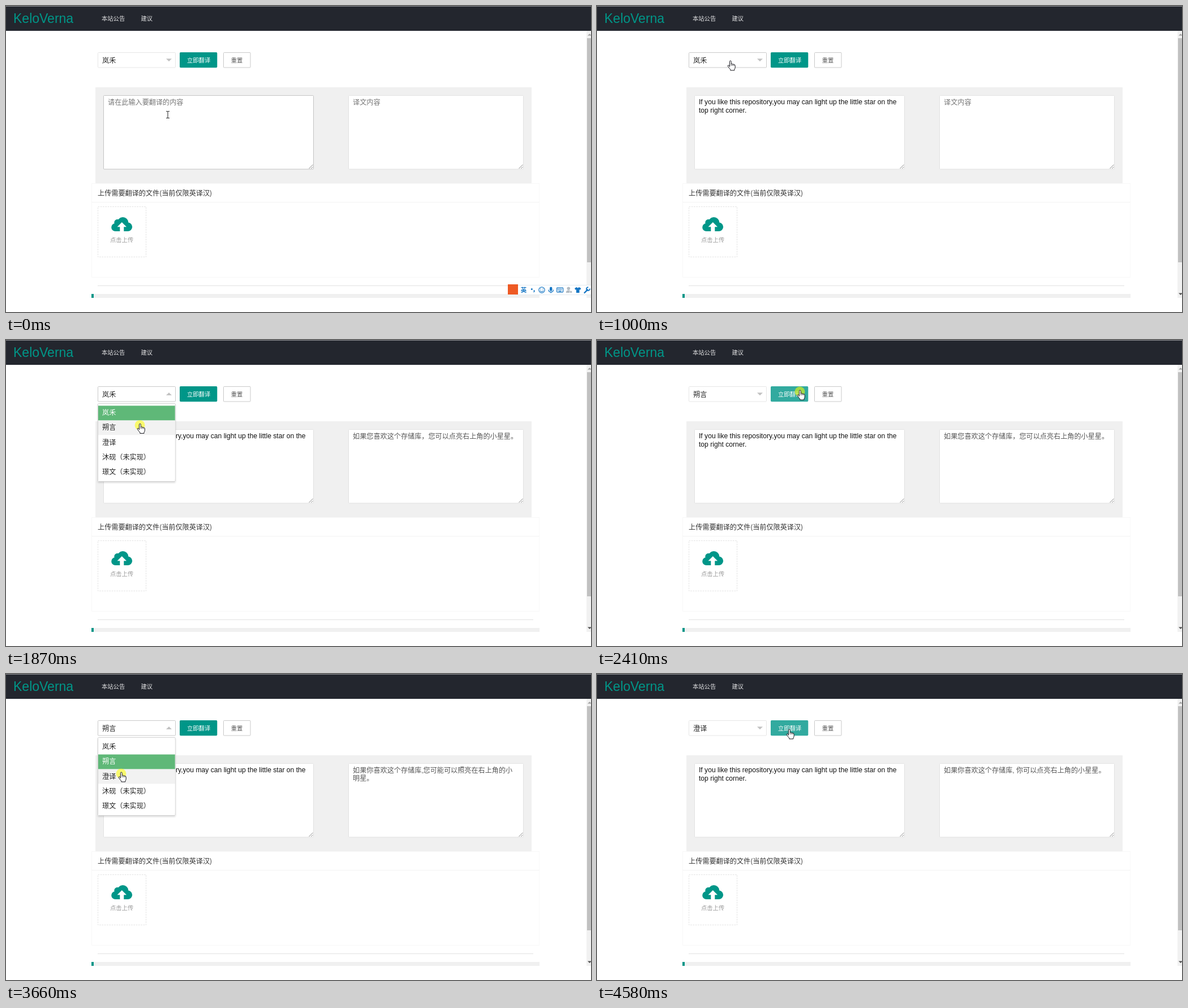
Recreate the animation shown at these times as an HTML page. Size 1034x542 px, loop 4.98 s.

```html
<!DOCTYPE html>
<html lang="zh-CN">
<head>
<meta charset="utf-8">
<title>KeloVerna</title>
<style>
html, body { margin: 0; width: 100%; height: 100%; overflow: hidden; background: #fff; }
svg { display: block; width: 1034px; height: 542px; }
text { font: 12.14px "Liberation Sans", Arial, "Noto Sans CJK SC", "Noto Sans CJK", sans-serif; white-space: pre; }
.ui { font-family: "Noto Sans CJK SC", "Noto Sans CJK", sans-serif; }
.small { font-size: 10.3px; }
</style>
</head>
<body>
<svg viewBox="0 0 1034 542" xmlns="http://www.w3.org/2000/svg">
  <defs>
    <filter id="soft" x="-10%" y="-10%" width="120%" height="125%">
      <feDropShadow dx="0" dy="2" stdDeviation="1.8" flood-color="#000" flood-opacity=".14"/>
    </filter>
    <path id="grip" d="M-7 0L0 -7M-3.2 0L0 -3.2" stroke="#777" stroke-width=".9"/>
  </defs>
  <rect width="1034" height="542" fill="#fff"/>

  <!-- header -->
  <rect width="1034" height="44" fill="#23262e"/>
  <rect width="1034" height="1" fill="#8f9194"/>
  <text x="13" y="30" fill="#009688" style="font-size:23px">KeloVerna</text>
  <g fill="#e4e4e5">
    <text class="ui small" x="169" y="26.4">本站公告</text>
    <text class="ui small" x="238.5" y="26.4">建议</text>
  </g>

  <!-- scrollbar -->
  <rect x="1026" y="44" width="8" height="473" fill="#f1f1f1"/>
  <rect x="1027" y="57" width="7" height="397" fill="#c1c1c1"/>
  <path d="M1028 52.5h7l-3.5 -3.5z" fill="#a3a3a3"/>
  <path d="M1028 508.5h7l-3.5 3.5z" fill="#505050"/>

  <!-- form row -->
  <rect id="box" x="162.5" y="82.5" width="137" height="26.5" rx="1" fill="#fff"/>
  <text id="chosen" class="ui" x="170" y="100.8" fill="#222"></text>
  <path id="edge" d="M-5 -5H5L0 0z" fill="#c2c2c2"/>
  <g id="go">
    <rect x="307" y="82" width="66.3" height="27.3" rx="1.7" fill="#009688"/>
    <text class="ui small" x="320" y="99.6" fill="#fff" font-weight="500">立即翻译</text>
  </g>
  <rect x="384.5" y="82.5" width="47.5" height="26.5" rx="1" fill="#fff" stroke="#c9c9c9"/>
  <text class="ui small" x="397.8" y="99.6" fill="#555">重置</text>

  <!-- text panel -->
  <rect x="158" y="144" width="771" height="170" fill="#f0f0f0"/>
  <rect id="area" x="172.5" y="158.5" width="371" height="130.5" rx="1" fill="#fff"/>
  <rect x="605.5" y="158.5" width="309" height="130.5" rx="1" fill="#fff" stroke="#e2e2e2"/>
  <use href="#grip" x="542.5" y="288"/>
  <use href="#grip" x="913.5" y="288"/>
  <text id="hint" class="ui" x="180" y="175.3" fill="#757575">请在此输入要翻译的内容</text>
  <g id="typed" fill="#111">
    <text x="180" y="174.3">If you like this repository,you may can light up the little star on the</text>
    <text x="180" y="188.8">top right corner.</text>
  </g>
  <path id="caret" d="M265.5 178.5V191.5" stroke="#111"/>
  <text id="out1" x="613" y="174.8"></text>
  <text id="out2" x="613" y="189.4"></text>

  <!-- upload card -->
  <rect x="151.5" y="314.5" width="791" height="166" fill="none" stroke="#f8f8f8"/>
  <path d="M151 347.5H943" stroke="#f3f3f3"/>
  <text class="ui" x="162" y="336" fill="#333">上传需要翻译的文件(当前仅限英译汉)</text>
  <rect x="162.5" y="355.5" width="85" height="89" fill="#fff" stroke="#e2e2e2" stroke-dasharray="2.6 1.7"/>
  <g fill="#009688">
    <circle cx="206.5" cy="384" r="10"/>
    <circle cx="197" cy="383.5" r="5.7"/>
    <circle cx="193.2" cy="392" r="7"/>
    <circle cx="215.3" cy="391.2" r="7.8"/>
    <path d="M193 386H215V399H193z"/>
  </g>
  <path d="M204.8 383L213 391.3H208.3V399.5H201.3V391.3H196.6z" fill="#fff"/>
  <text class="ui small" x="184" y="417.8" fill="#999">点击上传</text>

  <path d="M162 495.5H932" stroke="#e2e2e2"/>
  <rect x="151" y="510" width="792" height="7" fill="#f0f0f0"/>
  <rect x="151" y="510" width="4" height="7" fill="#009688"/>

  <!-- input method bar -->
  <g id="ime">
    <rect x="900" y="494.5" width="140" height="17" fill="#fff" stroke="#e3e9ee"/>
    <rect x="887" y="493" width="18" height="18" fill="#ee5a24"/>
    <text class="ui" x="909.7" y="506.9" fill="#1576c4" style="font-size:10.5px;font-weight:bold">英</text>
    <g fill="#1576c4">
      <circle cx="929.3" cy="501.5" r="1.5"/>
      <path d="M932.5 503.5h2.2v2l-1.6 2h-.8l.7 -2h-.5z"/>
      <rect x="961" y="497.5" width="4.4" height="7.5" rx="2.2"/>
      <path d="M1008.5 498l2.2 1.4 2.2 -1.4 3.4 2 -1.2 2.8 -1.6 -.6v5.8h-5.6v-5.8l-1.6 .6 -1.2 -2.8z"/>
    </g>
    <g fill="none" stroke="#1576c4" stroke-width="1.2">
      <circle cx="947" cy="503" r="5.2"/>
      <path d="M944 504.2q3 3.6 6 0M945 500.5v1.6M949 500.5v1.6"/>
      <path d="M959 502.5q0 4.2 4.2 4.2t4.2 -4.2M963.2 506.7v2"/>
      <rect x="973.6" y="499.2" width="11" height="7.6" rx=".8"/>
      <path d="M975.2 501.4h8M975.2 503.2h8" stroke-dasharray="1.2 .8"/>
      <path d="M976.6 505.2h5"/>
    </g>
    <g fill="#b4bcc3">
      <circle cx="994.3" cy="500.3" r="2.8"/>
      <path d="M989.8 508q0 -4.4 4.5 -4.4t4.5 4.4z"/>
      <circle cx="998.6" cy="506.4" r="2.2" stroke="#fff" stroke-width=".8"/>
    </g>
    <path d="M1022.5 508L1028 502.4" stroke="#1576c4" stroke-width="2.4" stroke-linecap="round"/>
    <path d="M1031.8 500.6a3 3 0 1 1 -2.6 -2.4" fill="none" stroke="#1576c4" stroke-width="1.8"/>
  </g>

  <!-- drop-down list -->
  <g id="list">
    <rect x="162.5" y="112.5" width="136.7" height="138" rx="1" fill="#fff" stroke="#d2d2d2" filter="url(#soft)"/>
    <g id="rows"></g>
  </g>

  <!-- pointer -->
  <circle id="spot" r="9" fill="#ffff00" opacity=".55"/>
  <g id="pointer">
    <g id="hand" fill="#fff" stroke="#16161c" stroke-width="1" stroke-linejoin="round">
      <path d="M-1.6 10.5V1.4Q-1.6 0 -.2 0T1.2 1.4V6Q1.6 5.2 2.5 5.3 3.6 5.5 3.7 6.4 4.2 5.9 5 6 6.1 6.2 6.1 7.2 6.6 6.8 7.3 7 8.2 7.3 8.2 8.4V12Q8 14 6.9 15.2V17H-.2V15.5Q-2.5 13 -4.6 9.8 -5.3 8.4 -4.2 7.9 -3.2 7.6 -1.6 9.6z"/>
      <path d="M1.2 6V9M3.7 6.4V9M6.1 7.2V9" fill="none" stroke-width=".8"/>
    </g>
    <path id="arrow" d="M0 0V13.6L3.2 10.7 5.2 15.2 7.2 14.3 5.2 9.9H9.6z" fill="#fff" stroke="#111" stroke-width=".9"/>
    <path id="beam" d="M-3 -5.5H-1Q0 -5.5 0 -4.5 0 -5.5 1 -5.5H3M0 -5V6M-3 6.5H-1Q0 6.5 0 5.5 0 6.5 1 6.5H3" fill="none" stroke="#333" stroke-width="1.1"/>
  </g>
</svg>
<script>
const LOOP = 4980;
const $ = id => document.getElementById(id);
const engines = ["岚禾", "朔言", "澄译", "沐砚（未实现）", "璟文（未实现）"];
const results = [
  ["译文内容", ""],
  ["如果您喜欢这个存储库，您可以点亮右上角的小星星。", ""],
  ["如果你喜欢这个存储库,您可能可以照亮在右上角的小", "明星。"],
  ["如果你喜欢这个存储库, 你可以点亮右上角的小星星。", ""]
];
// screen updates: first, last, count
const runs = [[0, 0, 1], [230, 230, 1], [470, 920, 7], [1000, 1480, 7], [1560, 1640, 2], [1800, 2260, 7],
  [2330, 2650, 5], [2820, 3280, 7], [3350, 3350, 1], [3580, 4050, 7], [4120, 4200, 2], [4350, 4580, 4]];
// pointer path: time, x, y
const path = [[400, 286, 192], [620, 312, 135], [695, 330, 100], [770, 331, 97], [845, 312, 97], [920, 262, 96],
  [1000, 236, 97], [1240, 240, 97], [1480, 242, 96], [1560, 240, 112], [1640, 238, 145], [1800, 238, 147],
  [1950, 236, 150], [2100, 290, 118], [2180, 335, 98], [2260, 358, 92], [2330, 359, 89], [2490, 359, 89],
  [2570, 315, 93], [2650, 255, 97], [2820, 233, 98], [3050, 231, 98], [3200, 208, 170], [3280, 205, 181],
  [3350, 205, 183], [3580, 204, 174], [3730, 204, 174], [3890, 270, 128], [4050, 351, 110], [4120, 347, 104],
  [4200, 343, 102], [4350, 341, 100], [4580, 340, 98]];
const opens = [[1240, 1950], [2895, 3730]];
const clicks = [770, 1240, 1870, 2410, 2890, 3650, 4420];

const steps = runs.flatMap(([a, b, n]) =>
  Array.from({ length: n }, (_, i) => n > 1 ? Math.floor((a + (b - a) * i / (n - 1)) / 10) * 10 : a));

const rows = engines.map((name, i) => {
  const make = (tag, attrs) => {
    const el = document.createElementNS("http://www.w3.org/2000/svg", tag);
    for (const k in attrs) el.setAttribute(k, attrs[k]);
    return $("rows").appendChild(el);
  };
  const y = 116.4 + 26.1 * i;
  const band = make("rect", { x: 163, y, width: 135.7, height: 26.1 });
  const label = make("text", { class: "ui", x: 170, y: y + 16.9 });
  label.textContent = name;
  return { y, band, label };
});

const set = (id, k, v) => $(id).setAttribute(k, v);
const show = (id, on) => set(id, "visibility", on ? "visible" : "hidden");
const inside = ([x, y], l, t, r, b) => x >= l && x <= r && y >= t && y <= b;
const count = (t, ...times) => times.filter(v => t >= v).length;

// cubic-bezier(.25, .1, .25, 1)
function ease(x) {
  if (x <= 0) return 0;
  if (x >= 1) return 1;
  const curve = (s, a, b) => 3 * a * s * (1 - s) ** 2 + 3 * b * s * s * (1 - s) + s ** 3;
  let lo = 0, hi = 1;
  for (let i = 0; i < 24; i++) {
    const mid = (lo + hi) / 2;
    if (curve(mid, .25, .25) < x) lo = mid; else hi = mid;
  }
  return curve(lo, .1, 1);
}

function pointerAt(t) {
  const i = path.findIndex(p => p[0] > t);
  if (i === 0) return path[0].slice(1);
  if (i < 0) return path[path.length - 1].slice(1);
  const [a, b] = [path[i - 1], path[i]];
  const k = (t - a[0]) / (b[0] - a[0]);
  return [a[1] + (b[1] - a[1]) * k, a[2] + (b[2] - a[2]) * k];
}

function draw(time) {
  const t = steps.filter(s => s <= time).pop();
  const pos = pointerAt(t);
  const open = opens.find(([a, b]) => t >= a && t < b);
  const overBox = inside(pos, 162, 82, 300, 109);
  const overGo = inside(pos, 307, 82, 373, 109);
  const overList = open && inside(pos, 162, 112, 300, 251);
  const overArea = !overList && inside(pos, 172, 158, 544, 289);
  const focusBox = (t >= 1240 && t < 2330) || (t >= 2895 && t < 4350);
  const focusArea = t < 770;
  const chosen = count(t, 1950, 3730);

  set("box", "stroke", overBox || focusBox ? "#c9c9c9" : "#e6e6e6");
  $("chosen").textContent = engines[chosen];
  set("go", "opacity", overGo ? .8 : 1);

  set("area", "stroke", focusArea ? "#c4c4c4" : "#e2e2e2");
  show("hint", t < 230);
  show("typed", t >= 230);
  show("caret", t >= 230 && focusArea);
  show("ime", focusArea);

  const n = count(t, 1320, 2650, 4580);
  results[n].forEach((line, i) => {
    const id = "out" + (i + 1);
    $(id).textContent = line;
    set(id, "fill", n ? "#555" : "#757575");
  });

  let turn = 0;
  for (const [a, b] of opens)
    if (t >= a) turn = t < b ? ease((t - a) / 300) : 1 - ease((t - b) / 300);
  set("edge", "transform", `translate(288 ${98.2 - 5.2 * turn}) rotate(${180 * turn})`);

  set("list", "display", open ? "inline" : "none");
  if (open) {
    set("list", "transform", `translate(0 ${26 * (1 - turn)})`);
    set("list", "opacity", .3 + .7 * turn);
    rows.forEach(({ y, band, label }, i) => {
      const hover = overList && pos[1] + 1 >= y && pos[1] + 1 < y + 26.1;
      band.setAttribute("fill", i === chosen ? "#5fb878" : hover ? "#f2f2f2" : "#fff");
      label.setAttribute("fill", i === chosen ? "#fff" : "#222");
    });
  }

  const hand = overBox || overGo || overList;
  show("hand", hand);
  show("beam", !hand && overArea);
  show("arrow", !hand && !overArea);
  set("pointer", "transform", `translate(${pos})`);
  show("spot", clicks.some(c => t >= c && t < c + 70));
  set("spot", "cx", pos[0] - .5);
  set("spot", "cy", pos[1] + 2.5);
}

const start = performance.now();
function tick() {
  draw((performance.now() - start) % LOOP);
  requestAnimationFrame(tick);
}
tick();
</script>
</body>
</html>
```
